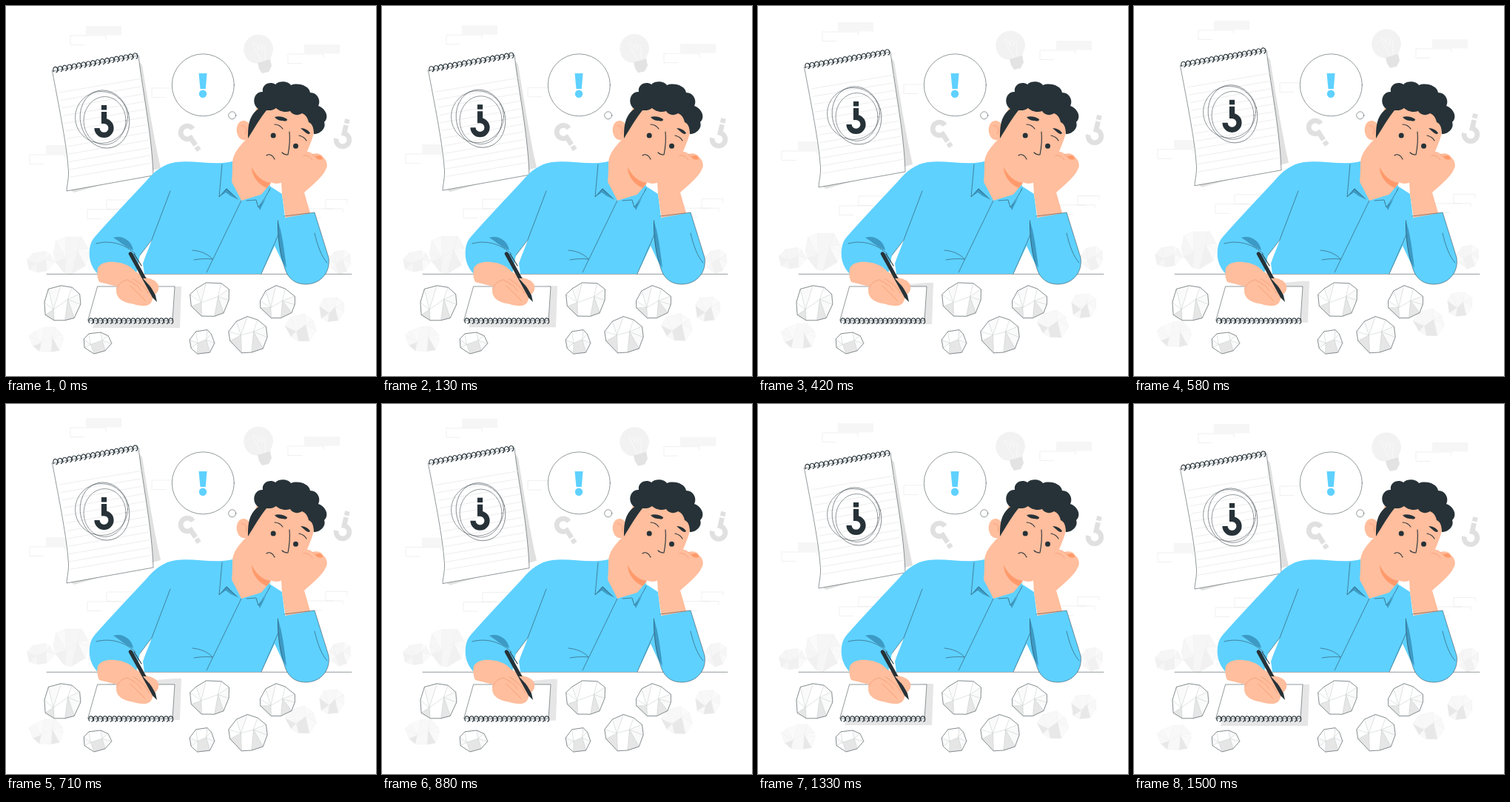
An HTML page for the animation above (1540 ms loop, 500 by 500 pixels).

```html
<!DOCTYPE html>
<html lang="en">
<head>
<meta charset="utf-8">
<title>Searching for an idea</title>
<style>
html, body { margin: 0; width: 100%; height: 100%; overflow: hidden; background: #fff; }
svg { display: block; width: 100vw; height: 100vh; }
.ink { fill: none; stroke: #263238; stroke-width: .5; stroke-linecap: round; stroke-linejoin: round; }
.sheet { fill: #fff; }
.bold { stroke-width: 1.1; }
.dark { fill: #263238; }
.blue { fill: #5ed1ff; }
.shade { fill: #3d9ac4; }
.skin { fill: #ffbe9d; }
.warm { fill: #ff9a6c; }
.fold { fill: none; stroke: #f08f66; stroke-width: .6; stroke-linecap: round; }
.brick { fill: none; stroke: #e6e6e6; stroke-width: .6; }
.rule { stroke: #e6e6e6; stroke-width: .7; }
.mark { fill: none; stroke-width: 7.2; }
</style>
</head>
<body>
<svg viewBox="0 0 500 500" xmlns="http://www.w3.org/2000/svg">
  <defs>
    <g id="hook">
      <path class="mark" d="M0-22V-9.500A9.500 9.500 0 1 1 -9.500 0"/>
      <path class="mark" d="M0-31V-24.500"/>
    </g>
  </defs>

  <g id="float">
    <g id="bricks"></g>
    <g id="paleBalls"></g>
    <path fill="#e6e6e6" d="M133 387L228 379H237L235 435H117Z"/>

    <path fill="#f2f2f2" d="M341 38.500A20 20 0 0 1 361 58C361 64 357 69 357 73L342 78C339 77 334 78 330 75A20 20 0 0 1 341 38.500Z"/>
    <path fill="none" stroke="#fafafa" d="M346 75L335 55C331 51 334 48 337 52L342 59C339 51 344 49 345 55L346 60C345 51 351 51 350 57V73"/>
    <path fill="#e3e3e3" d="M340 77L357 72L359 81L355 89L346 91L342 85Z"/>

    <use href="#hook" stroke="#e0e0e0" transform="translate(455 181) rotate(13) scale(.93)"/>
    <use href="#hook" stroke="#e0e0e0" transform="translate(245 171) rotate(147) scale(.93)"/>

    <path fill="#e0e0e0" d="M178 72L184 80C192 130 200 180 209 219L92 252L84 247L180 225Z"/>
    <path class="ink sheet" d="M62.500 88L179 67C184 112 197 172 199 229L82 250C82 242 86 231 84 218C82 190 74 148 62.500 88Z"/>
    <g id="rules"></g>
    <g id="topCoil"></g>
    <g class="ink">
      <ellipse cx="129" cy="150.500" rx="35.500" ry="35"/>
      <ellipse cx="133.500" cy="153" rx="33" ry="39.500" transform="rotate(-14 133.500 153)"/>
      <ellipse cx="133.500" cy="155" rx="28.500" ry="32.500"/>
    </g>
    <use href="#hook" stroke="#263238" transform="translate(132.500 165)"/>
  </g>

  <path class="ink" d="M55 362.300H467"/>

  <!-- thought bubble -->
  <circle class="ink sheet" cx="266.300" cy="106.800" r="42"/>
  <circle class="ink sheet" cx="305.700" cy="147.800" r="5"/>
  <path class="blue" d="M260.500 91H271.500L269.800 112H262.500Z"/>
  <circle class="blue" cx="266" cy="118.800" r="5.200"/>

  <!-- shirt -->
  <path class="blue" d="M307 210C280 216 255 208 230 211C213 213 200 224 190 236C165 263 140 289 120 312C113 320 112 330 113 340C114 349 119 357 124 362H345L363 324L378 356L377 286L373 254L356 243L318 263Z"/>
  <path fill="#fff" d="M197 316C193 328 188 338 185 348L187 362H176L181 337Z"/>
  <path class="shade" d="M145 313C157 309 170 317 172 330C163 327 153 318 145 313Z"/>
  <path class="ink" d="M222 250L197 316L181 337M122 321C140 316 160 321 175 335M318 263L271 360M252 330C264 331 274 336 279 342C269 341 261 342 254 343M345 362L368 309"/>

  <!-- neck and head -->
  <path class="skin" d="M328 176C320 186 307 196 306 212L305 238L318 263L345 255L358 240L350 190Z"/>
  <path class="warm" d="M332 217C337 229 346 237 357 239L353 246C342 242 332 231 332 217Z"/>
  <path class="skin" d="M340 135L400 130L420 150L416 172C412 186 406 199 402 207C394 225 376 241 365 240C348 238 334 226 330 211L327 180C317 185 310 174 312 164C314 154 324 152 329 160Z"/>
  <path class="fold" d="M318 162C324 160 326 167 324 173"/>
  <path class="dark" d="M327 179C327 165 327 149 341 139C331 132 335 115 347 116C345 106 357 101 364 106C370 100 382 102 385 107C395 103 410 108 411 117C421 117 426 128 422 135C433 139 437 151 430 157C433 165 425 173 416 173C416 165 414 159 409 157C407 149 404 147 400 145C394 149 387 147 384 142C376 145 368 141 365 138C360 142 355 141 352 141C343 152 335 166 327 179Z"/>
  <path class="dark" d="M363 150C369 148 376 150 380 153C380 156 377 156 374 155C370 155 366 154 363 150ZM398 165C404 165 409 168 411 172C408 175 404 170 398 165Z"/>
  <circle class="dark" cx="361.200" cy="175" r="3.500"/>
  <circle class="dark" cx="391.500" cy="189.300" r="3.500"/>
  <path class="ink bold" d="M363 160C368 160 371 162 374 166M396 175C400 176 404 178 406 182M383 170C384 181 383 191 381 201C378 201 375 200 373 198M352 202C356 199 361 202 363 207"/>

  <!-- collar -->
  <path class="shade" d="M288 258L298 246L313 261L304 257L297 252ZM325 263L339 264L357 248L343 276L338 264Z"/>
  <path class="blue" d="M293 215L306 210L305 238L318 263L298 246L288 258ZM319 263L345 255L357 241L355 255L341 272L338 262Z"/>
  <path class="ink" d="M292 214L288 258L298 247L313 261M357 246C353 255 347 264 341 272L338 262L325 263"/>

  <!-- propped arm -->
  <path class="skin" d="M372 238C376 225 386 211 397 202C402 196 409 195 414 200C419 198 427 200 428 204C433 207 436 216 432 221C428 231 412 244 403 252L412 283L378 288L373 255Z"/>
  <path class="warm" d="M418 203C423 201 428 202 428 207C424 209 420 207 418 203Z"/>
  <path class="fold" d="M402 202C407 201 411 204 414 208M414 200L421 207"/>
  <path class="blue" d="M367 288L417 279L436 340C439 360 425 376 405 376C387 376 379 364 376 352C372 335 368 312 367 288Z"/>
  <path class="shade" d="M367 289C373 305 376 330 379 354C371 344 367 320 367 289Z"/>
  <path class="ink" d="M376 284L417 279L436 340C439 360 425 376 405 376C387 376 379 364 376 352C370 333 367 312 367.500 290M417 307C421 324 426 338 434 347"/>

  <g id="balls"></g>

  <!-- writing pad, hand and pen -->
  <path class="ink sheet" d="M124 379H228L225 425H111Z"/>
  <g id="deskCoil"></g>
  <path class="skin" d="M124 354C130 344 144 345 154 347C163 349 170 353 175 359L192 368C200 369 208 375 206 382C206 386 203 389 200 391L197 399C194 407 182 406 173 403C160 401 149 396 149 385L150 379L126 373C123 367 123 360 124 354Z"/>
  <path class="fold" d="M149 383C151 377 157 371 164 370C171 374 177 376 183 385M172 369C181 374 188 380 193 389M168 378L188 398"/>
  <path class="dark" d="M165.500 335C166 332 169 331 171 334L202 391L204 400L198 394Z"/>
  <path class="ink bold" d="M173 335L183 351"/>
  <path class="skin" d="M185 368C195 367 206 373 206 381C205 386 201 388 199 385C196 379 190 374 185 368Z"/>
</svg>
<script>
const LOOP = 1540, RISE = 8, LEAD = 30;
const NS = "http://www.w3.org/2000/svg";
const byId = id => document.getElementById(id);

function add(id, tag, attrs) {
  const el = document.createElementNS(NS, tag);
  for (const key in attrs) el.setAttribute(key, attrs[key]);
  byId(id).appendChild(el);
}

function seeded(seed) {
  return () => {
    seed = (seed * 16807) % 2147483647;
    return seed / 2147483647;
  };
}

// Open rings along a binding edge
function coil(id, n, x0, y0, dx, dy) {
  for (let i = 0; i < n; i++) {
    add(id, "path", {
      class: "ink bold",
      d: "M-2.4 2.6C-4.6-.6-2.3-4 .2-3.6C3.4-3.2 3.6 3.2.8 3.6",
      transform: `translate(${x0 + i * dx} ${y0 + i * dy})`
    });
  }
}

// Crumpled paper: a jagged rim whose edges fold towards the nearer of two creases
function ball(id, [x, y, w, h], tones, edge) {
  const rand = seeded(x * 131 + y * 17);
  const n = w > 45 ? 10 : 8;
  const rim = Array.from({ length: n }, (_, i) => {
    const a = (i + .5 * rand()) / n * 2 * Math.PI, r = .86 + .18 * rand();
    return [x + w / 2 * (1 + r * Math.cos(a)), y + h / 2 * (1 + r * Math.sin(a))];
  });
  const crease = [-1, 1].map(s => [x + w * (.5 + s * (.1 + .14 * rand())), y + h * (.5 - s * .16 * rand())]);
  const near = p => crease[p[0] < x + w / 2 ? 0 : 1];
  const line = edge ? "#b5babc" : "#ededed";
  add(id, "polygon", { points: rim.join(" "), fill: tones[0] });
  rim.forEach((p, i) => {
    const q = rim[(i + 1) % n];
    const low = (p[1] + q[1]) / 2 > y + h * .6;
    add(id, "polygon", {
      points: [p, q, near(q), near(p)].join(" "),
      fill: tones[low && i % 2 ? 2 : i % 3 ? 0 : 1],
      stroke: line, "stroke-width": .3, "stroke-linejoin": "round"
    });
  });
  if (edge) add(id, "polygon", { points: rim.join(" "), class: "ink" });
}

const slab = (x, y) => add("bricks", "rect", { x, y, width: 48, height: 12.5, fill: "#f6f6f6" });
const frame = (x, y, w = 48) =>
  add("bricks", "path", { class: "brick", d: `M${x + w * .4} ${y + 12.5}H${x}V${y}h${w}v5` });

// Each slab sits one course above an outlined brick
[[87, 40, 21], [381, 65, 22], [32, 201, 22]].forEach(([x, y, shift]) => {
  frame(x, y);
  slab(x + shift, y - 13);
});
frame(197, 111);
frame(136, 262);
frame(110, 275);
frame(432, 261.5, 29);
frame(407, 274);

const soft = ["#f6f6f6", "#fafafa", "#f1f1f1"];
const mist = ["#f8f8f8", "#fafafa", "#e8e8e8"];
const paper = ["#fff", "#fafafa", "#e6e6e6"];

// x, y, width, height
[[61, 309, 54, 53], [26, 330, 39, 32], [436, 328, 31, 34]].forEach(b => ball("paleBalls", b, soft));
[[31, 432, 49, 38], [377, 416, 44, 39], [422, 392, 37, 36]].forEach(b => ball("paleBalls", b, mist));
[[48, 377, 56, 51], [249, 370, 56, 51], [343, 378, 48, 45], [301, 419, 53, 51], [104, 440, 38, 30], [246, 437, 38, 34]]
  .forEach(b => ball("balls", b, paper, true));

for (let i = 0; i < 12; i++) {
  const y = 117 + i * 10.4;
  add("rules", "line", { class: "rule", x1: 72 + 14 * Math.sin(i / 7.3), y1: y, x2: 184 + i * 1.1, y2: y - 19 });
}
coil("topCoil", 18, 67, 86, 6.35, -1.09);
coil("deskCoil", 18, 115, 425.5, 6.35, 0);

function draw(now) {
  const turn = 2 * Math.PI * (now + LEAD) / LOOP;
  const y = -RISE / 2 * (1 - Math.cos(turn));
  byId("float").setAttribute("transform", `translate(0 ${y.toFixed(3)})`);
}

let start;
function tick(now) {
  start ??= now;
  draw(now - start);
  requestAnimationFrame(tick);
}
draw(0);
requestAnimationFrame(tick);
</script>
</body>
</html>
```
